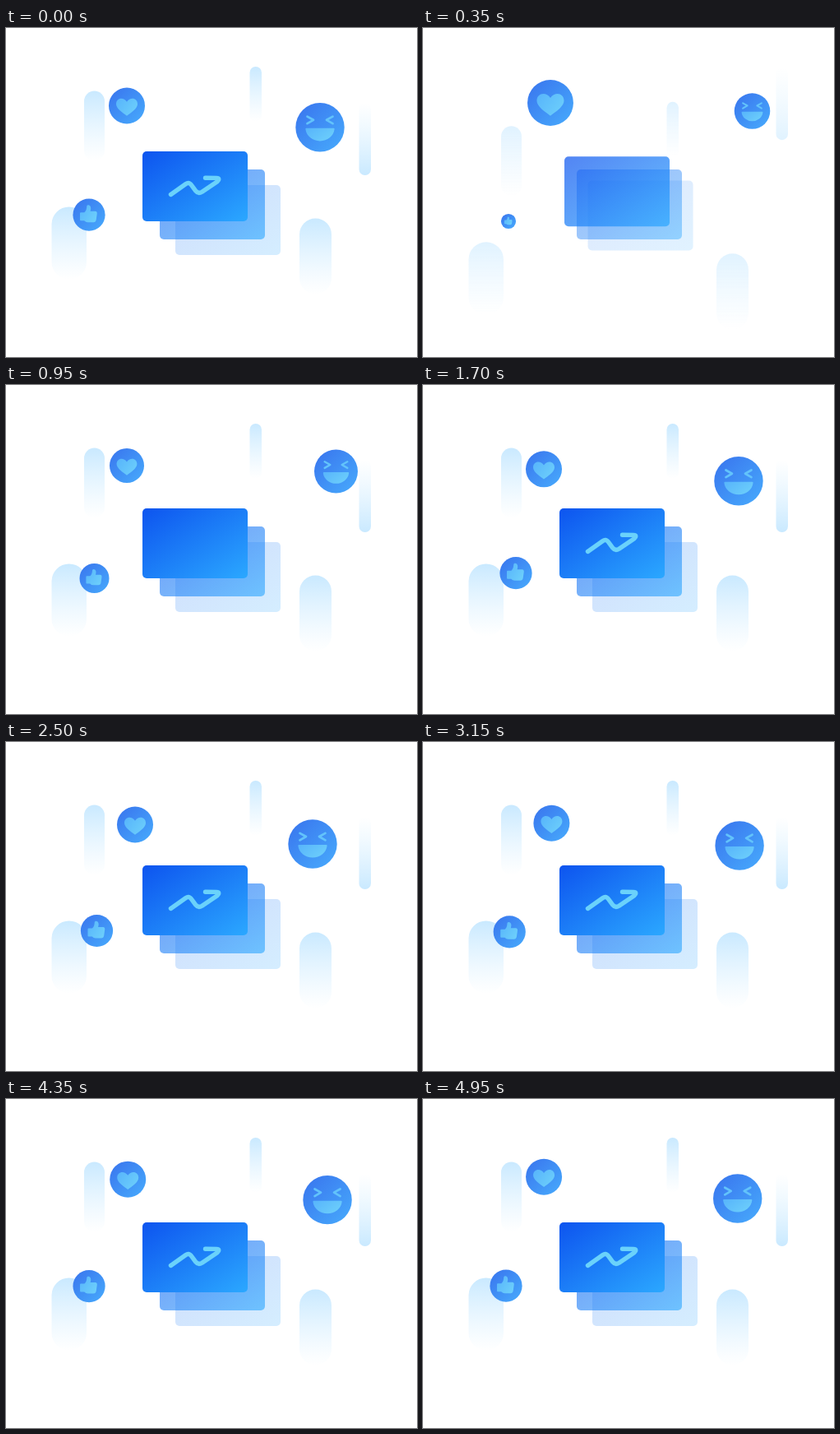
Write an HTML page that moves like this. It is 500x400 px and loops after 5 s.

```html
<!DOCTYPE html>
<html lang="en">
<head>
<meta charset="utf-8">
<title>Reactions</title>
<style>
  html, body { margin: 0; width: 100%; height: 100%; overflow: hidden; background: #fff; }
  svg { display: block; width: 500px; height: 400px; }
</style>
</head>
<body>
<svg viewBox="0 0 500 400">
  <defs>
    <linearGradient id="fadeDown" x2="0" y2="1">
      <stop stop-color="#c9e9ff"/><stop offset="1" stop-color="#d8f0ff" stop-opacity="0"/>
    </linearGradient>
    <linearGradient id="fadeUp" x2="0" y1="1" y2="0">
      <stop stop-color="#c9e9ff"/><stop offset="1" stop-color="#d8f0ff" stop-opacity="0"/>
    </linearGradient>
    <linearGradient id="card" x2="1" y2="1">
      <stop stop-color="#0d54ef"/><stop offset="1" stop-color="#2ba8ff"/>
    </linearGradient>
    <linearGradient id="disc" x1=".1" y1=".1" x2=".9" y2=".9">
      <stop stop-color="#3a79ef"/><stop offset="1" stop-color="#46a6fb"/>
    </linearGradient>
    <linearGradient id="symbol" x2="1" y2=".6">
      <stop stop-color="#57b4fb"/><stop offset="1" stop-color="#6bcdfb"/>
    </linearGradient>
  </defs>

  <g id="rising" fill="url(#fadeDown)">
    <rect x="95" y="76.5" width="25" height="85" rx="12.5"/>
    <rect x="55.5" y="217.5" width="42.5" height="88" rx="21"/>
    <rect x="296.5" y="47" width="14.5" height="67" rx="7.2"/>
    <rect x="357" y="231.5" width="39" height="92" rx="19.5"/>
  </g>
  <rect id="falling" x="429.5" y="91" width="14.5" height="88" rx="7.2" fill="url(#fadeUp)"/>

  <g id="cards" fill="url(#card)">
    <rect width="128" height="85" rx="5"/>
    <rect width="128" height="85" rx="5"/>
    <rect width="128" height="85" rx="5"/>
  </g>
  <path id="arrow" pathLength="1" fill="none" stroke="#6ad2fb" stroke-width="5.4"
    stroke-linecap="round" stroke-linejoin="round"
    d="M200.5 202.5L218.5 189.7Q222.5 186.8 225.5 190.8L231 198.3Q234 202 238.5 199.2L257 186.7Q261 182.5 256 182.4L242.5 182.2"/>

  <g id="heart">
    <circle r="22" fill="url(#disc)"/>
    <path fill="url(#symbol)" d="M0 12.3C-5 8.5-13 3.5-13-2C-13-9.6-4-11 0-4.8C4-11 13-9.6 13-2C13 3.5 5 8.5 0 12.3Z"/>
  </g>
  <g id="laugh">
    <circle r="29.7" fill="url(#disc)"/>
    <path fill="none" stroke="#62c3fb" stroke-width="2.7" stroke-linecap="round" stroke-linejoin="round"
      d="M-15.5-13.2L-8-9L-15.5-4.6M15.5-13.2L8-9L15.5-4.6"/>
    <path fill="url(#symbol)" d="M-16.5 1H16.5Q17.8 1 17.6 2.3A17.7 16 0 0 1-17.6 2.3Q-17.8 1-16.5 1Z"/>
  </g>
  <g id="thumb">
    <circle r="19.6" fill="url(#disc)"/>
    <path fill="url(#symbol)" d="M-10-3H-5.6C-3.2-5-3-7.5-2.7-10.6C-2-13 2.6-12 2.2-7.5L1.6-4.5H7.6Q10.2-4.3 9.7-1.2L8.7 6Q8.2 9 5.4 9H-1.5Q-4 9-5.8 7H-10Q-11 7-11 6V-2Q-11-3-10-3Z"/>
  </g>
</svg>

<script>
const LOOP = 5000, START = 50;
const $ = id => document.getElementById(id);
const clamp = p => Math.min(1, Math.max(0, p));
const ease = (t, from, length) => (1 - Math.cos(Math.PI * clamp((t - from) / length))) / 2;

// Smooth curve through values[i] at times[i], held outside its range.
function curve(times, values, t) {
  const last = times.length - 1;
  if (t <= times[0]) return values[0];
  if (t >= times[last]) return values[last];
  const i = times.findIndex(k => k > t) - 1;
  const slope = k => {
    const a = Math.max(0, k - 1), b = Math.min(last, k + 1);
    return (values[b] - values[a]) / (times[b] - times[a]);
  };
  const h = times[i + 1] - times[i], p = (t - times[i]) / h, q = 1 - p;
  return q * q * (1 + 2 * p) * values[i] + p * p * (1 + 2 * q) * values[i + 1]
    + h * p * q * (q * slope(i) - p * slope(i + 1));
}

const driftTimes = [350, 950, 1700, 2500, 3250, 3800, 4400, 5000];
const bubbles = {
  heart: {
    x: [155, 147, 147, 157, 156, 152, 148, 147],
    y: [91, 98, 102.3, 100.5, 98.6, 98.8, 97.5, 94.5],
    popTimes: [50, 350, 700, 950, 1150, 1400], pop: [0, 1.27, 0.9, 0.955, 1, 1]
  },
  laugh: {
    x: [400.5, 401.5, 384, 373, 387, 395, 390.5, 382],
    y: [101, 105, 116.7, 124, 126, 124.5, 122.5, 120.8],
    popTimes: [150, 350, 530, 900, 1250, 1500], pop: [0, 0.73, 1.25, 0.9, 1, 1]
  },
  thumb: {
    x: [104, 107.5, 113, 110.5, 104.5, 102, 101, 101],
    y: [235, 235, 228.7, 229.5, 230.8, 228.2, 227.5, 227.2],
    popTimes: [200, 350, 560, 850, 1150, 1400], pop: [0, 0.46, 1.25, 0.92, 1, 1]
  }
};

// Back to front: offset from the middle card, and opacity.
const cards = [[19, 19, 0.2], [0, 0, 0.6], [-21, -22, 1]];

function draw(now) {
  let t = now % LOOP;
  if (t < START) t = LOOP;

  const slide = ease(t, 40, 570), shift = 100 * (1 - slide);
  $('rising').setAttribute('transform', `translate(0 ${shift})`);
  $('falling').setAttribute('transform', `translate(0 ${-shift})`);
  $('rising').setAttribute('opacity', slide);
  $('falling').setAttribute('opacity', slide);

  const spread = ease(t, START, 470);
  cards.forEach(([dx, dy, alpha], i) => {
    const card = $('cards').children[i];
    card.setAttribute('transform', `translate(${187 + dx * spread} ${172 + dy * spread})`);
    card.setAttribute('opacity', alpha * spread);
  });

  const drawn = ease(t, 1000, 600);
  $('arrow').setAttribute('stroke-dasharray', `${drawn} 2`);
  $('arrow').setAttribute('visibility', drawn > 0 ? 'visible' : 'hidden');

  for (const [id, b] of Object.entries(bubbles)) {
    const x = curve(driftTimes, b.x, t), y = curve(driftTimes, b.y, t);
    const scale = Math.max(0, curve(b.popTimes, b.pop, t));
    $(id).setAttribute('transform', `translate(${x} ${y}) scale(${scale})`);
  }
  requestAnimationFrame(draw);
}
draw(0);
</script>
</body>
</html>
```
